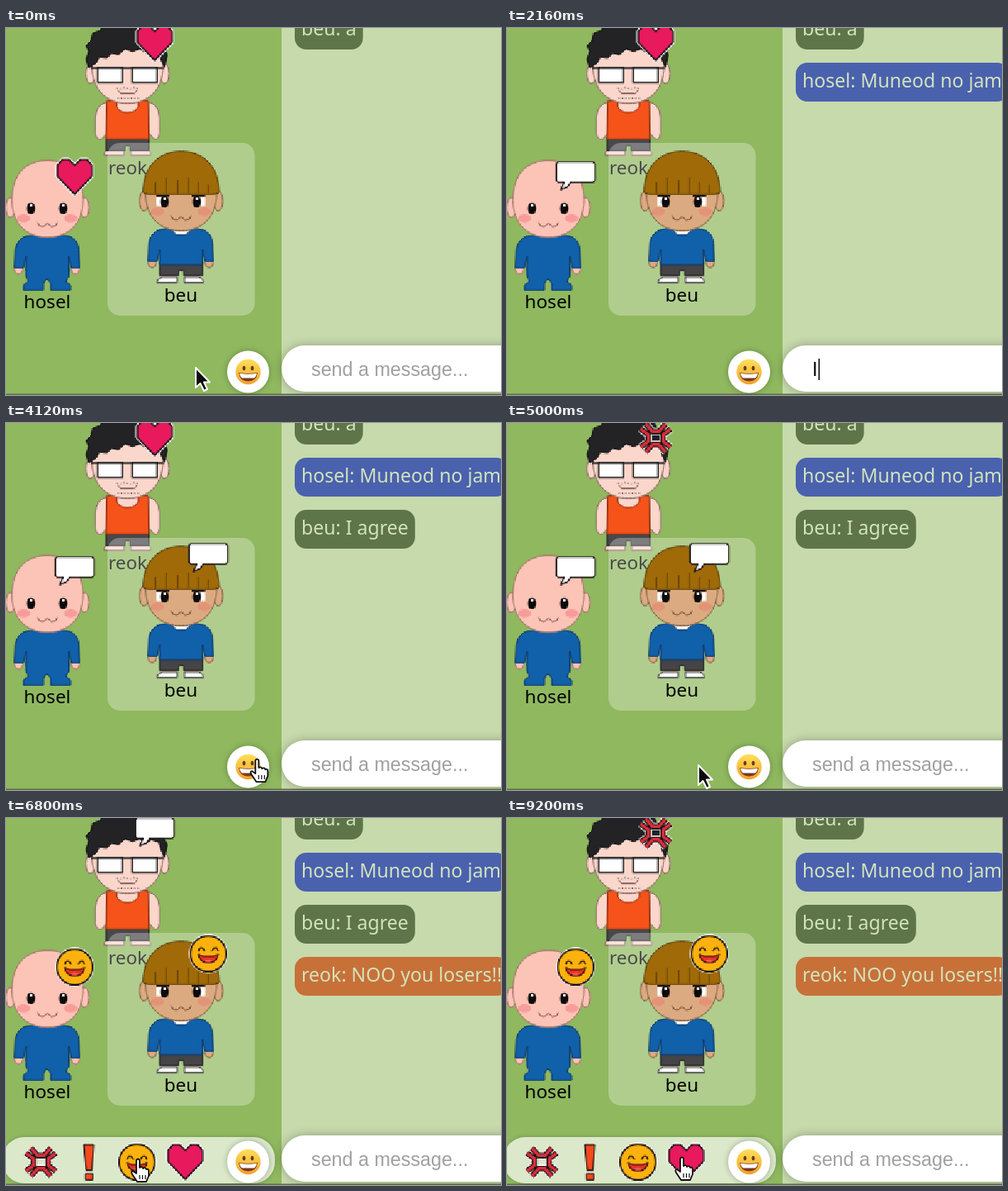
An HTML page with a canvas that plays this animation: 600 by 444 pixels, repeating every 9.24 s.

```html
<!DOCTYPE html>
<html lang="en">
<head>
<meta charset="utf-8">
<title>Pixel chat room</title>
<style>
html, body { margin: 0; width: 100%; height: 100%; overflow: hidden; background: #8fb85f; }
canvas { display: block; width: 100vw; height: 100vh; }
</style>
</head>
<body>
<canvas id="stage" width="600" height="444"></canvas>
<script>
const ctx = document.getElementById('stage').getContext('2d');
const LOOP = 9240;
const PIXEL = 1.5;
const CHAT_FONT = '23.1px "Noto Sans", sans-serif';
const LABEL_FONT = '22.5px "Noto Sans", sans-serif';
const INPUT_FONT = '23.3px "Liberation Sans", Arial, sans-serif';

function shape(g, d, fill, stroke, width = 1.5) {
  const p = new Path2D(d);
  if (fill) { g.fillStyle = fill; g.fill(p); }
  if (stroke) { g.strokeStyle = stroke; g.lineWidth = width; g.stroke(p); }
}
function oval(g, x, y, rx, ry, fill, stroke, width = 1.5) {
  g.beginPath();
  g.ellipse(x, y, rx, ry, 0, 0, Math.PI * 2);
  if (fill) { g.fillStyle = fill; g.fill(); }
  if (stroke) { g.strokeStyle = stroke; g.lineWidth = width; g.stroke(); }
}
function box(g, x, y, w, h, fill) {
  g.fillStyle = fill;
  g.fillRect(x, y, w, h);
}
function pill(x, y, w, h, r, fill) {
  ctx.beginPath();
  ctx.roundRect(x, y, w, h, r);
  ctx.fillStyle = fill;
  ctx.fill();
}
function text(str, x, y, font, fill, align = 'left') {
  ctx.font = font;
  ctx.textAlign = align;
  ctx.fillStyle = fill;
  ctx.fillText(str, x, y);
}
function withShadow(blur, color, draw) {
  ctx.save();
  ctx.shadowBlur = blur;
  ctx.shadowColor = color;
  draw();
  ctx.restore();
}

// Renders a drawing on a coarse grid, shown later without smoothing.
function sprite(w, h, ox, oy, draw) {
  const c = document.createElement('canvas');
  c.width = Math.ceil(w / PIXEL);
  c.height = Math.ceil(h / PIXEL);
  const g = c.getContext('2d');
  g.scale(1 / PIXEL, 1 / PIXEL);
  g.translate(ox, oy);
  g.lineJoin = 'round';
  draw(g);
  return (x, y) => {
    ctx.imageSmoothingEnabled = false;
    ctx.drawImage(c, x - ox, y - oy, c.width * PIXEL, c.height * PIXEL);
  };
}
const person = draw => sprite(108, 171, 3, -150, draw);
const icon = draw => sprite(54, 54, 27, 27, draw);

// People
const HEAD = 'M7 208C7 176 24 160 50 160S93 176 93 208C93 237 75 253 50 253S7 237 7 208Z';
const SWEATER = 'M34 250H66L77 252Q87 256 88 268L89 290H79L76 276V294H24V276L21 290H10L11 268Q13 256 23 252Z';

function head(g, skin, line) {
  for (const x of [5, 95]) oval(g, x, 217, 5.5, 12, skin, line);
  shape(g, HEAD, skin, line);
}
function face(g, cheek, line) {
  for (const x of [21, 78]) oval(g, x, 230, 8, 5, cheek);
  for (const x of [30, 69]) {
    oval(g, x, 218, 5, 7, '#0c0a0a');
    box(g, x - 1.5, 213, 3, 3, '#fff');
  }
  shape(g, 'M38 235L40 239L45 240L50 236L55 240L60 239L62 235', null, line);
}
function hands(g, skin, line) {
  for (const x of [15, 84]) oval(g, x, 292, 5, 5.5, skin, line);
}

const bald = person(g => {
  const skin = '#fcc4b7', line = '#a9776c', blue = '#1160aa', navy = '#0e3d70';
  hands(g, skin, line);
  shape(g, 'M24 289H76V300L72 306L78 311V317H54V309L51 304H48L45 309V317H21V311L27 306L24 300Z', blue, navy);
  shape(g, SWEATER, blue, navy);
  box(g, 25, 290, 50, 6, blue);
  head(g, skin, line);
  face(g, '#f79c9a', '#8d5a55');
});

const fringe = person(g => {
  const skin = '#dcaa81', line = '#8a684c', blue = '#1160aa', navy = '#0e3d70';
  hands(g, skin, line);
  box(g, 28, 305, 17, 6, skin);
  box(g, 55, 305, 17, 6, skin);
  shape(g, 'M24 290H76V307H53V301H47V307H24Z', '#454446', '#2d2c2e');
  shape(g, 'M27 309H45V316H21V313ZM54 309H72L77 313V316H54Z', '#fff', '#4c4c4c');
  shape(g, SWEATER, blue, navy);
  shape(g, 'M37 250H64L56 258H44Z', '#fff', navy);
  head(g, skin, line);
  for (const x of [20, 69]) box(g, x, 212, 10, 11, '#fff');
  face(g, '#e39377', '#76513b');
  shape(g, 'M20 211H36M63 211H79', null, '#1d1410', 1.8);
  shape(g, 'M4 207C4 174 24 157 50 157S96 174 96 207L90 209H10Z', '#a06a08', '#5f4008');
  shape(g, 'M19 208V194M32 208V189M46 208V192M59 208V189M71 208V194M83 208V197', null, '#65440a');
});

const curly = person(g => {
  const skin = '#fbd6cb', line = '#8f6e66';
  box(g, 33, 248, 34, 18, skin);
  shape(g, 'M26 251Q12 254 11 270V289Q12 298 19 296L25 289ZM75 251Q88 254 89 270V289Q88 298 82 296L76 289Z', skin, line);
  shape(g, 'M25 308H46V316H22V313ZM54 308H75L78 313V316H54Z', skin, line);
  shape(g, 'M24 294H76V310H53V304H47V310H24Z', '#48484a', '#2c2c2e');
  shape(g, 'M25 250H37V257Q40 264 50 264T63 257V250H75L76 296H24Z', '#f55319', '#9e3512');
  head(g, skin, line);
  shape(g, 'M3 210L0 200L3 190L0 183L6 177L8 168L17 165L20 159L28 161L34 156L43 159L50 155L58 159L66 156L73 162L82 163L86 171L94 176L94 186L98 194L95 209L91 201L88 191L79 188L73 192L65 187L56 190L47 187L39 194L31 192L25 198L16 197L12 204Z', '#232225', '#121113');
  box(g, 6, 209, 88, 2, '#171717');
  for (const x of [13, 55]) {
    box(g, x, 208.5, 32, 20, '#171717');
    box(g, x + 2, 211, 28, 15.5, '#fff');
  }
  shape(g, 'M38 237L42 241H58L62 237', null, '#7d5753');
  for (let x = 37; x < 64; x += 4) {
    box(g, x, 233 + (x % 3), 1.5, 1.5, '#85706b');
    box(g, x + 1, 245 + (x % 2), 1.5, 1.5, '#85706b');
  }
});

// Reactions
const INK = '#171013';
const HEART = 'M0 21L-21 -1V-14L-15 -21H-7L0 -14L7 -21H15L21 -14V-1Z';
const BUBBLE = 'M-21 -18.5H21L23.5 -16V4L21 6.5H-6L-10 12L-18 15.5L-14 6.5H-21L-23.5 4V-16Z';
// Four chevrons, each pointing to the centre.
const CHEVRONS = 'M-12 -17L-4 -8H4L12 -17M-12 17L-4 8H4L12 17M-18 -11L-9 -4V4L-18 11M18 -11L9 -4V4L18 11';

const heart = icon(g => {
  shape(g, HEART, null, '#fff', 4.5);
  shape(g, HEART, '#e8195c', INK, 1.8);
});
const talk = icon(g => shape(g, BUBBLE, '#fff', INK, 1.6));
const angry = icon(g => {
  shape(g, CHEVRONS, null, '#fff', 9);
  shape(g, CHEVRONS, null, INK, 6.8);
  shape(g, CHEVRONS, null, '#d9303a', 3.8);
});
const laugh = icon(g => {
  oval(g, 0, 0, 23.5, 23.5, '#fff');
  oval(g, 0, 0, 21.7, 21.7, '#fcb20e', INK, 1.8);
  shape(g, 'M-12 -3L-10 -7H-7L-4 -3M4 -3L7 -7H10L12 -3', null, '#291806', 1.8);
  shape(g, 'M-12 1L-6 3H6L12 1Q10 11 0 11T-12 1Z', '#ea3328', '#431511', 1.6);
  shape(g, 'M-5 8.5Q0 5.5 5 8.5Q0 11 -5 8.5Z', '#f66b61');
});
const alertMark = icon(g => {
  shape(g, 'M-6 -21H6L4 10H-3ZM-4 14H5V21.5H-4Z', '#f5491c', INK, 1.5);
});

function grin(x, y) {
  withShadow(7, 'rgba(0,0,0,.28)', () => oval(ctx, x, y, 25.5, 25.5, '#fff'));
  ctx.save();
  ctx.translate(x, y);
  const glow = ctx.createLinearGradient(0, -15, 0, 15);
  glow.addColorStop(0, '#ffdf58');
  glow.addColorStop(1, '#f0a02c');
  oval(ctx, 0, 0, 15.2, 15.2, glow);
  for (const ex of [-5, 5]) oval(ctx, ex, -4.5, 1.9, 2.7, '#67401b');
  shape(ctx, 'M-11.5 1Q0 3 11.5 1Q10 11.5 0 11.5T-11.5 1Z', '#7c3a1e');
  shape(ctx, 'M-10.5 1.8Q0 3.6 10.5 1.8Q10 6 7.5 7.5H-7.5Q-10 6 -10.5 1.8Z', '#fff');
  ctx.restore();
}

// Pointers
const ARROW = 'M0 0V24L5.5 19L10 28L14 26L10 17.5H17Z';
const HAND = 'M-2 1Q0 -2 2 1V10Q5 8 6 11Q9 9 10 12Q13 11 13 14V20L10 27H-1L-7 18Q-9 14 -6 14L-2 17Z';

const ease = p => p * p * (3 - 2 * p);
const clamp = v => Math.max(0, Math.min(1, v));
const PATH = [
  [0, 230, 411], [500, 230, 411], [1300, 421, 396], [3600, 421, 396],
  [4500, 232, 414], [5200, 232, 414], [5600, 293, 415], [5850, 293, 415],
  [6300, 160, 413], [8400, 160, 413], [8900, 212, 411], [LOOP, 212, 411]
];
function pointerAt(t) {
  const i = PATH.findIndex(k => k[0] > t);
  const [t0, x0, y0] = PATH[i - 1], [t1, x1, y1] = PATH[i];
  const p = ease((t - t0) / (t1 - t0));
  return [x0 + (x1 - x0) * p, y0 + (y1 - y0) * p];
}
function drawPointer(t) {
  if (t > 2150 && t < 3550) return;
  const [x, y] = pointerAt(t);
  ctx.save();
  ctx.translate(x, y);
  ctx.lineJoin = 'round';
  if (x > 340 && y > 384) {
    const beam = 'M-5 -12Q0 -12 0 -8Q0 -12 5 -12M0 -9V9M-5 12Q0 12 0 8Q0 12 5 12M-3 4H3';
    shape(ctx, beam, null, '#fff', 4);
    shape(ctx, beam, null, '#111', 2);
  } else if (t > 5800 || Math.hypot(x - 294, y - 416) < 25) {
    shape(ctx, HAND, '#fff', '#111', 1.8);
    shape(ctx, 'M2 19V24M5.5 19V24M9 19V24', null, '#111', 1.2);
  } else {
    shape(ctx, ARROW, '#0b0b0b', '#fff', 2);
  }
  ctx.restore();
}

// Timed states
const latest = (list, t) => list.reduce((v, [at, next]) => t >= at ? next : v, null);
const MOODS = [
  { x: 180, y: 18, list: [[0, heart], [4400, angry], [5500, talk], [7200, angry]] },
  { x: 83, y: 180, list: [[0, heart], [900, talk], [6550, laugh], [7300, heart], [8300, laugh]] },
  { x: 245, y: 164, list: [[3400, talk], [6400, laugh]] }
];
const MESSAGES = [
  [0, 'beu: a', '#5e7549'],
  [900, 'hosel: Muneod no jam', '#4a61ae'],
  [3400, 'beu: I agree', '#5e7549'],
  [5500, 'reok: NOO you losers!!', '#c77139']
];

function drawMood({ x, y, list }, t) {
  const mood = latest(list, t);
  if (mood) mood(x, y);
}
function drawRoom(t) {
  box(ctx, 0, 0, 600, 444, '#8fb85f');
  curly(97, -162);
  text('reok', 147.5, 177, LABEL_FONT, '#000', 'center');
  drawMood(MOODS[0], t);
  pill(123, 139, 178.5, 209, 15, 'rgba(255,255,255,.29)');
  bald(0, 0);
  text('hosel', 50, 339, LABEL_FONT, '#000', 'center');
  fringe(162, -8);
  text('beu', 212, 331, LABEL_FONT, '#000', 'center');
  drawMood(MOODS[1], t);
  drawMood(MOODS[2], t);
}
function drawChat(t) {
  box(ctx, 334, 0, 266, 444, '#c7daac');
  MESSAGES.forEach(([at, str, color], i) => {
    if (t < at) return;
    const top = -21 + i * 63;
    ctx.font = CHAT_FONT;
    pill(350, top, ctx.measureText(str).width + 16, 47, 14, color);
    text(str, 358, top + 30, CHAT_FONT, '#d3e3bc');
  });
}
function drawPanel(t) {
  const open = ease(clamp((t - 5750) / 250));
  if (!open) return;
  const left = 268 - 272 * open;
  withShadow(5, 'rgba(0,0,0,.2)', () => pill(left, 386, 326 - left, 56, 26, '#dbe8ca'));
  ctx.save();
  ctx.beginPath();
  ctx.rect(left, 380, 326 - left, 64);
  ctx.clip();
  [angry, alertMark, laugh, heart].forEach((draw, i) => draw(42 + i * 58.4, 416));
  ctx.restore();
}
function drawInput(t) {
  withShadow(12, 'rgba(0,0,0,.28)', () => pill(334, 384, 330, 56, 28, '#fff'));
  const word = 'I agree';
  const typed = t < 3400 ? Math.floor(clamp((t - 2000) / 1000) * word.length) : 0;
  if (!typed) {
    text('send a message...', 370, 421, INPUT_FONT, '#a0a0a0');
  } else {
    const str = word.slice(0, typed);
    text(str, 370, 421, INPUT_FONT, '#0a0a0a');
    box(ctx, 371 + ctx.measureText(str).width, 400, 1.6, 26, '#111');
  }
}

function frame(now) {
  const t = now % LOOP;
  drawRoom(t);
  drawChat(t);
  box(ctx, 0, 442.5, 600, 1.5, '#5d6e44');
  drawPanel(t);
  grin(293.5, 416);
  drawInput(t);
  drawPointer(t);
  requestAnimationFrame(frame);
}
requestAnimationFrame(frame);
</script>
</body>
</html>
```
